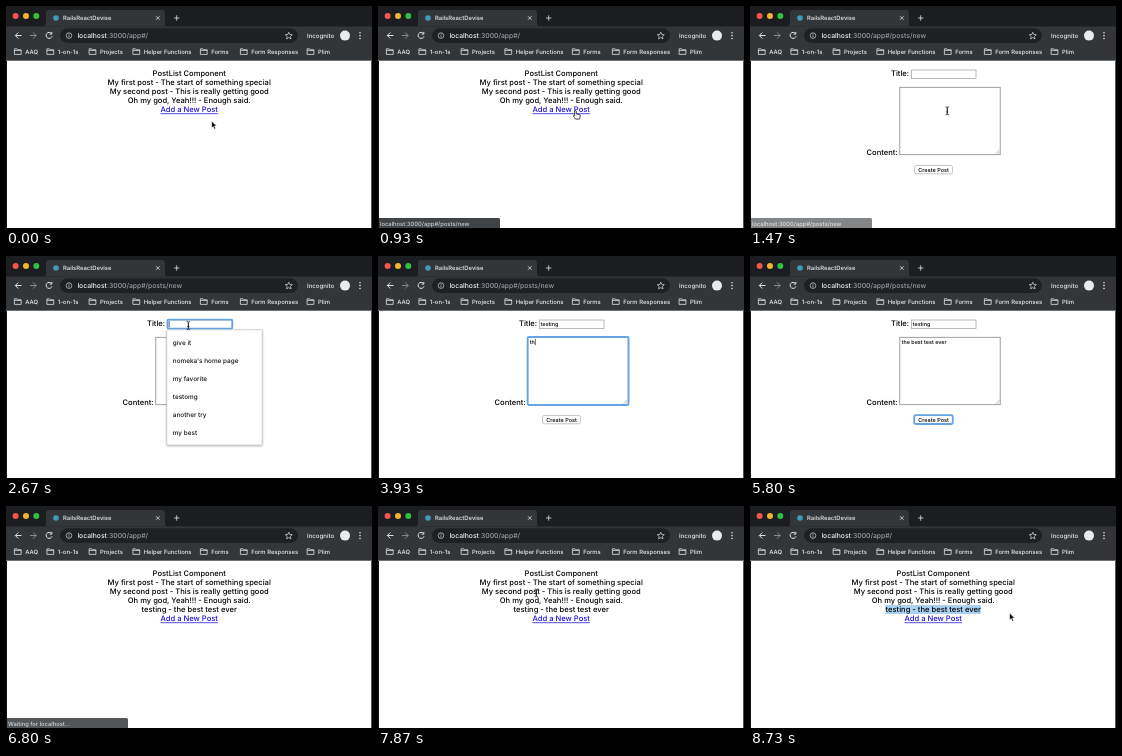
Recreate the animation shown at these times as an HTML page. Size 366 by 222 pixels, loop 9270 ms.

```html
<!DOCTYPE html>
<html lang="en">
<head>
<meta charset="utf-8">
<title>Post form</title>
<style>
  html, body { margin: 0; width: 100%; height: 100%; overflow: hidden; background: #fff; }
  svg {
    display: block; width: 366px; height: 222px;
    font-family: Inter, Roboto, sans-serif; font-weight: 500; text-rendering: geometricPrecision;
  }
</style>
</head>
<body>
<svg viewBox="0 0 366 222">
  <g id="page"></g>
  <g id="chrome"></g>
  <g id="over"></g>
</svg>
<script>
const LOOP = 9270, FPS = 15, MID = 183.2, BODY = 7.58, FIELD = 5.4;
const $ = id => document.getElementById(id);
const pen = document.createElement('canvas').getContext('2d');

const width = (s, size) => {
  pen.font = '500 100px Inter, Roboto, sans-serif';
  return pen.measureText(s).width * size / 100;
};
const text = (s, x, y, size, fill = '#000', more = '') =>
  `<text x="${x}" y="${y}" font-size="${size}" fill="${fill}" ${more}>${s}</text>`;
const rect = (x, y, w, h, fill, more = '') =>
  `<rect x="${x}" y="${y}" width="${w}" height="${h}" fill="${fill}" ${more}/>`;
const circle = (x, y, r, fill, more = '') =>
  `<circle cx="${x}" cy="${y}" r="${r}" fill="${fill}" ${more}/>`;
const line = (d, color, w = 1, more = '') =>
  `<path d="${d}" fill="none" stroke="${color}" stroke-width="${w}" ${more}/>`;

const bookmarks = [[8, 'AAQ'], [40.5, '1-on-1s'], [82.7, 'Projects'], [126.5, 'Helper Functions'],
  [194, 'Forms'], [234, 'Form Responses'], [300.7, 'Plim']];
const posts = ['My first post - The start of something special',
  'My second post - This is really getting good', 'Oh my god, Yeah!!! - Enough said.'];
const added = 'testing - the best test ever';
const hints = ['give it', "nomeka's home page", 'my favorite', 'testomg', 'another try', 'my best'];

// [time, text so far]
const titleKeys = [[0, ''], [2870, 't'], [2930, 'te'], [3000, 'tes'], [3130, 'test'],
  [3200, 'testi'], [3330, 'testin'], [3400, 'testing']];
const contentKeys = [[0, ''], [3800, 't'], [3930, 'th'], [4000, 'the'], [4130, 'the '], [4200, 'the b'],
  [4400, 'the be'], [4530, 'the bes'], [4600, 'the best'], [4730, 'the best '],
  [4870, 'the best t'], [4930, 'the best te'], [5070, 'the best test'], [5200, 'the best test '],
  [5330, 'the best test ev'], [5470, 'the best test eve'], [5600, 'the best test ever']];
// [time, x, y]
const pathKeys = [[204, 205.6, 115], [870, 197.5, 104.5], [1735, 197.2, 105], [2004, 190, 82],
  [2135, 190, 82], [2337, 182.5, 69.5], [7470, 172, 74.5], [8404, 137.5, 106], [8737, 259.6, 107]];

const latest = (keys, t) => keys.filter(k => k[0] <= t).pop()[1];
const ramp = (t, a, b) => Math.min(1, Math.max(0, (t - a) / (b - a)));

function pointer(t) {
  let i = 0;
  while (i < pathKeys.length - 2 && t >= pathKeys[i + 1][0]) i++;
  const [a, x, y] = pathKeys[i], [b, x2, y2] = pathKeys[i + 1];
  const p = ramp(t, a, b), e = p * p * (3 - 2 * p);
  return [x + (x2 - x) * e, y + (y2 - y) * e];
}

function chrome(url) {
  const pale = '#dfe1e5';
  let s = rect(0, 0, 366, 55, '#323639') + rect(0, 0, 366, 20.5, '#1c1d20') +
    '<path d="M37 20.5q3 0 3-3V7q0-3 3-3H156q3 0 3 3V17.5q0 3 3 3Z" fill="#323639"/>' +
    circle(9.6, 10.1, 3, '#f4564d') + circle(20, 10.1, 3, '#f3b530') + circle(30.3, 10.1, 3, '#2fc141') +
    circle(50, 12, 2.8, '#3f9cb8') + text('RailsReactDevise', 57, 14.2, 5.9, '#eee') +
    line('M150 10.2l3.6 3.6m0-3.6l-3.6 3.6M168 12h5.4m-2.7-2.7v5.4', pale, .8) +
    line('M15.5 29.5H9.3m3-3l-3 3l3 3', pale, 1) +
    line('M24 29.5h6.2m-3-3l3 3l-3 3', '#85888c', 1) +
    line('M45.4 27.4a3 3 0 1 0 .6 2.9m-.2-4.4v2.2h-2.2', pale, 1) +
    rect(54, 22.3, 238, 14.6, '#1f2023', 'rx="7.3"') +
    circle(63, 29.6, 2.8, 'none', 'stroke="#bdc1c6" stroke-width=".8"') +
    line('M63 29.2v2m0-3.3v.8', '#bdc1c6', .8) +
    text(`localhost<tspan fill="#9aa0a6">${url}</tspan>`, 71.4, 32.1, 6.8, '#f1f3f4') +
    line('M282.8 26.2l1 2.3 2.5.2-1.9 1.7.6 2.5-2.2-1.3-2.2 1.3.6-2.5-1.9-1.7 2.5-.2Z', pale, .7) +
    text('Incognito', 301, 31.8, 6.1, '#eee') + circle(339, 29.6, 5, '#e8eaed');
  for (const y of [26.7, 29.6, 32.5]) s += circle(354, y, .8, pale);
  for (const [x, name] of bookmarks)
    s += line(`M${x + .4} 42.8h2.6l.8 1h3.4v4.6h-6.8Zm0 1.6h6.8`, pale, .8) +
      text(name, x + 11.2, 47.6, 5.9, '#eee');
  return s + rect(0, 54, 366, 1, '#707274') + rect(0, 55, 1, 167, '#111') + rect(365, 55, 1, 167, '#555');
}

const row = (s, i, fill = '#000', more = '') =>
  text(s, MID, 70.4 + 9 * i, BODY, fill, `text-anchor="middle" ${more}`);

function listPage(t) {
  const lines = ['PostList Component', ...posts];
  let s = '';
  if (t >= 6670) lines.push(added);
  if (t >= 8470) {
    const w = width(added, BODY), x = MID - w / 2;
    s += rect(x, 99, Math.max(0, Math.min(pointer(t)[0] - x, w)), 9, '#abd2f2');
  }
  lines.forEach((l, i) => s += row(l, i));
  return s + row('Add a New Post', lines.length, '#1c12d0', 'text-decoration="underline"');
}

const ring = (x, y, w, h) =>
  rect(x, y, w, h, 'none', 'rx="1.5" stroke="#65a4e3" stroke-width="1.8"');
const field = (s, x, y, caret) => text(s, x, y, FIELD, '#000', 'style="white-space:pre"') +
  (caret ? rect(x + width(s, FIELD) + .1, y - 5.2, .6, 6.4, '#000') : '');

function formPage(t) {
  const title = latest(titleKeys, t);
  const inTitle = t >= 2600 && t < 3600, inContent = t >= 3600 && t < 5800;
  let s = text('Title:', 141, 70.4, BODY) + text('Content:', 116.5, 148.7, BODY) +
    rect(161.5, 64, 64.5, 8.5, '#fff', 'stroke="#aaa" stroke-width=".8"') +
    rect(149.8, 81.3, 100.4, 67.4, '#fff', 'stroke="#888" stroke-width=".8"') +
    line('M245.5 147.8l4-4m-2 4l2-2', '#999', .6) +
    rect(164.5, 159.4, 38, 8.4, '#fff', 'rx="2" stroke="#b5b5b5" stroke-width=".8"') +
    text('Create Post', 183.5, 165.6, 5.5, '#000', 'text-anchor="middle"');
  if (inTitle) s += ring(161.4, 63.7, 65, 9);
  if (inContent) s += ring(149.6, 81, 101, 68);
  if (t >= 5800) s += ring(164.2, 159.2, 38.6, 8.8);
  s += field(title, 162.7, 70.2, inTitle) + field(latest(contentKeys, t), 151.7, 88, inContent);
  const found = hints.filter(h => h.startsWith(title));
  if (t >= 2670 && inTitle && found.length) {
    s += rect(160.8, 73.8, 95.4, 18 * found.length + 7.2, '#fff',
      'rx="1" stroke="#c4c4c4" stroke-width=".7" style="filter:drop-shadow(0 1px 1px #0004)"');
    found.forEach((h, i) => s += text(h, 166.8, 89 + 18 * i, 6.4, '#111'));
  }
  return s;
}

function status(t) {
  const first = t < 3000;
  const alpha = first
    ? ramp(t, 600, 800) * (t < 1470 ? 1 : t < 1530 ? .65 : t < 1600 ? .3 : 0)
    : t < 6470 ? 0 : t < 6530 ? .6 : t < 6800 ? 1 : t < 6870 ? .9 : t < 6930 ? .4 : 0;
  const label = first ? 'localhost:3000/app#/posts/new' : 'Waiting for localhost...';
  return alpha ? `<g opacity="${alpha}">` +
    '<path d="M1 222V212H120q2 0 2 2V222Z" fill="#414447" style="filter:drop-shadow(0 0 .7px #0008)"/>' +
    text(label, 2, 219.6, 5.8, '#ccd0d4') + '</g>' : '';
}

const arrow = '<path d="M0 0V7L1.6 5.6L2.7 8.2L4 7.6L2.9 5.1H5Z" fill="#000" stroke="#fff" stroke-width=".6"/>';
const hand = '<path d="M-.8 .6Q0-.5 .8 .6V3.4L4 4Q5 4.3 4.8 5.5L4 8.6H0L-2.3 5.3Q-2 4.2-.8 5Z" fill="#fff" stroke="#000" stroke-width=".7"/>';
const beam = line('M-1.8-4Q0-4 0-3V3Q0 4-1.8 4M1.8-4Q0-4 0-3V3Q0 4 1.8 4M-1 1H1', '#222', .8);

function cursor(t) {
  if (t >= 2870 && t < 7530) return '';
  const [x, y] = pointer(t);
  const shape = t < 1130 && y < 108 ? hand : t < 1200 || x > 233 ? arrow : beam;
  return `<g transform="translate(${x} ${y})">${shape}</g>`;
}

let shown = -1;
function draw(now) {
  const step = Math.floor((now % LOOP + 4) * FPS / 1000);
  if (step === shown) return;
  shown = step;
  const t = step * 1000 / FPS + 4;
  const form = t >= 1130 && t < 6470;
  $('page').innerHTML = form ? formPage(t) : listPage(t);
  $('chrome').innerHTML = chrome(form ? ':3000/app#/posts/new' : ':3000/app#/');
  $('over').innerHTML = status(t) + cursor(t);
}

const start = performance.now();
function tick() {
  draw(performance.now() - start);
  requestAnimationFrame(tick);
}
tick();
</script>
</body>
</html>
```
